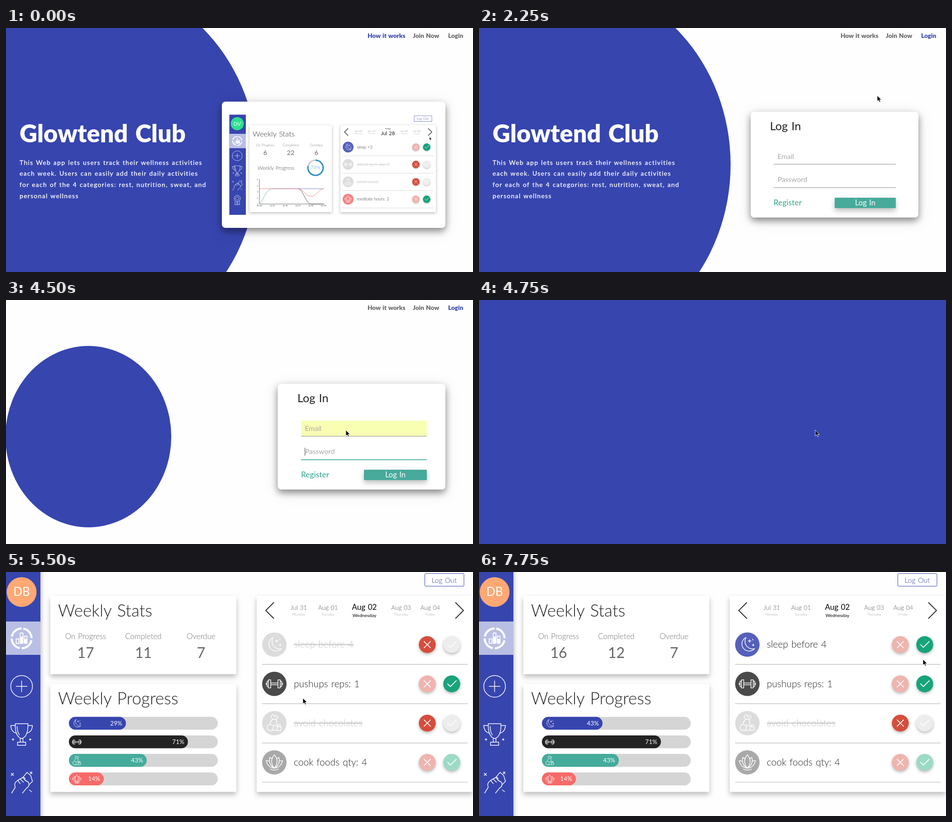
Recreate the animation shown at these times as an HTML page. Size 1032 px wide and 542 px high, loop 8 s.

```html
<!DOCTYPE html>
<html lang="en">
<head>
<meta charset="utf-8">
<title>Habit tracker tour</title>
<style>
html, body { margin: 0; width: 100%; height: 100%; overflow: hidden; background: #fefefe; }
svg { display: block; width: 1032px; height: 542px; }
text { font-family: Lato, sans-serif; word-spacing: .07em; white-space: pre; }
.ui { font-family: Inter, sans-serif; }
.medium { letter-spacing: 1.29px; stroke: #fff; stroke-width: .3px; }
.card { filter: drop-shadow(0 7px 8px rgba(0,0,0,.42)) drop-shadow(0 4px 14px rgba(0,0,0,.1)); }
.panel { filter: drop-shadow(0 6px 6px rgba(0,0,0,.26)); }
.mini { filter: drop-shadow(0 2px 3px rgba(0,0,0,.28)); }
.btn { filter: drop-shadow(0 3px 3px rgba(0,0,0,.28)); }
.side { filter: drop-shadow(2px 0 5px rgba(0,0,0,.25)); }
</style>
</head>
<body>
<svg id="stage" viewBox="0 0 1032 542"></svg>
<script>
const BLUE = '#3745af', TEAL = '#47aa9b', INK = '#222', GREY = '#707070';
const STEP = 250, STEPS = 32;

const text = (s, x, y, size, fill = INK, weight = 300, anchor = 'start', more = '') =>
  `<text x="${x}" y="${y}" font-size="${size}" fill="${fill}" font-weight="${weight}" text-anchor="${anchor}" ${more}>${s}</text>`;
const mid = (s, x, y, size, fill, weight) => text(s, x, y, size, fill, weight, 'middle');
const rect = (x, y, x2, y2, fill, more = '') =>
  `<rect x="${x}" y="${y}" width="${x2 - x}" height="${y2 - y}" fill="${fill}" ${more}/>`;
const disc = (x, y, r, fill, more = '') => `<circle cx="${x}" cy="${y}" r="${r}" fill="${fill}" ${more}/>`;
const line = (d, stroke, width = 1, more = '') =>
  `<path d="${d}" fill="none" stroke="${stroke}" stroke-width="${width}" ${more}/>`;
const at = (x, y, scale, body) => `<g transform="translate(${x} ${y}) scale(${scale})">${body}</g>`;
const white = (d, width = 1.5) => line(d, '#fff', width, 'stroke-linejoin="round" stroke-linecap="round"');

const icons = {
  stats: disc(0, 0, 22, 'none', 'stroke="#fff" stroke-width="4.5" stroke-dasharray="30 4.5" transform="rotate(-80)"') +
    white('M-12 11V1H-6V11ZM-3 11V-12H3V11ZM6 11V-5H12V11Z', 1.8) + rect(-3, -4, 3, 11, '#fff') + rect(6, 1, 12, 11, '#fff'),
  plus: white('M-24 0A24 24 0 1 1 24 0A24 24 0 1 1-24 0M0-12V12M-12 0H12'),
  trophy: white('M-14-23H14Q15 6 0 10Q-15 6-14-23ZM-14-19H-24Q-23-4-11-2M14-19H24Q23-4 11-2M-3 10V18H3V10M-9 25V18H9V25ZM-10-17Q-9-3-5 2M-19 10V14M-21 12H-17M19 10V14M17 12H21'),
  hands: white('M-22 24L-14 11Q-18 2-9-4L3-11Q9-11 7-5L15 0Q19 8 11 13L2 24M3-11L12-22L20-15L24-2L17 5M-9-4L-3 3M-3-7L4 0M3-10L9-3M-23-20L-18-15M-18-20L-23-15M19-23L23-19M23-23L19-19M17 17L22 21'),
  badge: white('M-15-8A15 15 0 1 1 15-8A15 15 0 1 1-15-8M-8-8A8 8 0 1 1 8-8A8 8 0 1 1-8-8M-11 4V24L-6 20L-2 24V8M11 4V24L6 20L2 24V8'),
  moon: white('M-3-16A16 16 0 1 0 16 9A17 17 0 0 1-3-16ZM5-11V-5M2-8H8M13-1V3M11 1H15M12-12V-10'),
  gym: white('M-8-2H8V2H-8ZM-13-9H-8V9H-13ZM13-9H8V9H13ZM-16-6H-13V6H-16ZM16-6H13V6H16ZM-18-2V2M18-2V2'),
  food: white('M-10 3Q-7-10 0-9Q7-8 5 3M-4-9Q-10-15-4-18Q0-20 1-14Q5-19 8-14Q8-10 3-9M-16 10A7 7 0 0 1-2 10A7 7 0 0 1-16 10M-2 5H6V16H-8M6 8H15V16H6M9 8V3H13V8'),
  lotus: white('M0-17Q12-3 0 13Q-12-3 0-17ZM-5-8L-10-11Q-14 4 0 13M5-8L10-11Q14 4 0 13M-11-3L-18-4Q-15 11 0 13M11-3L18-4Q15 11 0 13M-9 15Q0 19 9 15')
};
const icon = (name, x, y, scale) => at(x, y, scale, icons[name]);

const looks = {
  done: ['', INK, '#efb4ae', '#17a47b'],
  missed: ['#dcdcdc', '#c6c6c6', '#d64d3c', '#ededed'],
  open: ['#a9a9a9', INK, '#efb4ae', '#9bdac6']
};

function row(x, y, scale, [name, label, state, tint]) {
  const [shade, ink, no, yes] = looks[state];
  const strike = state == 'missed' ? 'text-decoration="line-through"' : '';
  return at(x, y, scale,
    disc(0, 0, 27, shade || tint) + icons[name] +
    text(label, 43, 7, 21, ink, 300, 'start', strike) +
    disc(338, 0, 18.7, no, 'class="btn"') + white('M331-7L345 7M345-7L331 7', 1.8) +
    disc(392, 0, 18.7, yes, 'class="btn"') + white('M383 0L389 6L402-7', 1.8) +
    line('M-27 44H427', '#c4c4c4', 1.4));
}

const stat = (x, y, size, label, n) =>
  mid(label, x, y, size, GREY) + mid(n, x, y + size * 2.5, size * 1.88, '#666', 400);

const hero = () =>
  text('Glowtend Club', 30, 253.5, 54, '#fff', 900) +
  ['This Web app lets users track their wellness activities',
   'each week. Users can easily add their daily activities',
   'for each of the 4 categories: rest, nutrition, sweat, and',
   'personal wellness'].map((s, i) =>
    text(s, 30, 303.5 + i * 24.7, 14, '#fff', 400, 'start', 'class="medium"')).join('');

const nav = active => [['How it works', 799], ['Join Now', 899], ['Login', 977]].map(([s, x], i) =>
  text(s, x, 22.3, 13.6, i == active ? BLUE : '#666', 900)).join('');

const blob = scale => `<ellipse cx="182" cy="303.5" rx="${374 * scale}" ry="${411 * scale}" fill="${BLUE}"/>`;

function chart(k) {
  const dip = 357 + 17 * [1, .75, .45, .2, .05, 0][Math.min(k, 5)];
  const days = [0, 1, 2, 3, 4, 5].map(i => 560 + i * 28.4);
  const dots = k < 4 ? '' : days.map((x, i) =>
    disc(x, 357, 1.2, '#fff', 'stroke="#e88" stroke-width=".7"') +
    (i == 0 || i > 3 ? disc(x, 391, 1.2, '#fff', 'stroke="#555" stroke-width=".7"') : '')).join('');
  return line('M560 336V391H703', '#444', .8) +
    [0, 2, 4, 6, 8].map(n => text(n, 557, 392.5 - n * 6.8, 4.5, '#555', 400, 'end')).join('') +
    days.map((x, i) => mid('Jul ' + (24 + i), x, 396, 4.2, INK, 400)).join('') +
    line('M560 391C570 380 576 357 588 357', '#6fb5b8') +
    line('M645 357C657 357 662 391 674 391H702', '#555') +
    line('M588 357H702', '#7b80d8') +
    line(`M560 357H645C656 357 663 ${dip} 674 ${dip}S692 357 702 357`, '#ec8484') + dots;
}

function preview(k) {
  const tasks = [
    ['moon', 'sleep +3', 'done', '#5560bb'], ['gym', 'attend gym qty: 2', 'missed'],
    ['food', 'avoid candy', 'missed'], ['lotus', 'meditate hours: 2', 'done', '#f5817f']];
  const dates = [[779, 'Jul 26', 'Wednesday'], [808, 'Jul 27', 'Thursday'], [880, 'Jul 29', 'Saturday'], [908, 'Jul 30', 'Sunday']];
  return rect(477, 163.5, 971, 444, '#fff', 'rx="8" class="card"') +
    rect(493.5, 192.5, 530, 415, BLUE) + rect(493.5, 235, 530, 267, '#b9bfe4') +
    disc(511, 212.5, 14.5, '#2de08f') + mid('DV', 511, 216.5, 11.5, '#fff', 400) +
    ['stats', 'plus', 'trophy', 'hands', 'badge'].map((n, i) => icon(n, 511, 251 + i * 32.8, .46)).join('') +
    rect(902, 195, 941, 207.5, '#fff', 'stroke="#8088cc"') + mid('Log Out', 921, 204, 7.3, BLUE) +
    rect(538, 216, 720, 409, '#fff', 'class="mini"') + text('Weekly Stats', 545, 241, 16.5, '#333') +
    stat(573, 262.5, 7.6, 'On Progress', 6) + stat(629, 262.5, 7.6, 'Completed', 22) + stat(686, 262.5, 7.6, 'Overdue', 6) +
    text('Weekly Progress', 556, 315, 11.3, '#444') +
    disc(684, 310.5, 16.8, 'none', 'stroke="#ccc" stroke-width="3"') +
    disc(684, 310.5, 16.8, 'none', 'stroke="#2f8fc6" stroke-width="3" pathLength="100" stroke-dasharray="79 21" transform="rotate(-90 684 310.5)"') +
    mid('79%', 684, 314, 11, '#4a9dcc') + chart(k) +
    rect(739, 216, 950, 409, '#fff', 'class="mini"') +
    line('M756 223L748 231L756 239', INK, 1.2) + line('M933 223L941 231L933 239', k < 5 ? INK : '#bbb', 1.2) +
    dates.map(([x, d, w]) => mid(d, x, 230.5, 6.3, GREY) + mid(w, x, 236, 3.7, '#999')).join('') +
    mid('Friday', 844, 225, 4.6, INK, 400) + mid('Jul 28', 844, 238, 11.6, INK, 400) +
    tasks.map((t, i) => row(756, 264.5 + i * 38.6, .443, t)).join('') +
    pointer(936, 242, .5);
}

function login(k) {
  const dx = k >= 17 ? 1 : 0, left = 651 + dx, right = k >= 17 ? 930 : 921;
  const email = 'doma@moved.test', typed = k >= 11 && k <= 13;
  const onPass = k >= 16, focus = k >= 10 && !onPass;
  const under = (y, on) => rect(left, y, right, y + (on ? 1.6 : 1.2), on ? '#2fa58e' : '#999');
  let s = rect(600.5, 186, 971, 421, '#fff', 'rx="8" class="card"') +
    text('Log In', 643 + dx, 227, 25.2, INK, 400);
  if (k >= 14) s += rect(left, 268, right, 302, '#f8ffb3');
  if (k == 14) s += rect(668, 276, 780, 293.5, '#a9cfd6');
  const value = typed ? 'd' : k >= 14 && k < 18 ? email : '';
  s += text(value || 'Email', 659.5 + dx, 290.5, value ? 14.8 : 15.6, value ? INK : '#aaa', 400) +
    under(302, focus) + under(354, onPass);
  const dots = k == 16 ? 4 : k == 17 ? 8 : 0;
  s += dots ? text('•'.repeat(dots), 660, 342, 16, INK, 400) : text('Password', 660 + dx, 342, 15.6, '#aaa', 400);
  if (k == 18) s += rect(660, 328, 661, 346, '#555');
  const bx = k >= 17 ? 791 : 786;
  s += text('Register', left, 394, 17.4, '#2fa58e', 400) +
    rect(bx, 377, right, 400, TEAL, 'rx="1" class="panel"') + mid('Log In', (bx + right) / 2, 394, 16.6, '#fff', 400);
  if (k >= 11 && k <= 14)
    s += rect(651.5, 304.5, 920.5, 345.5, '#fff', 'stroke="#a5bde6"') +
      (k == 14 ? rect(652, 305, 920, 325, '#a9d0ff') : '') +
      text(email, 658, 319.5, 10.4, '#000', 600, 'start', 'class="ui"') +
      text('dupo@51', 658, 339.5, 10.4, '#000', 600, 'start', 'class="ui"');
  return s;
}

function dashboard(k) {
  const slept = k >= 30, fresh = k >= 31, grow = k == 20 ? .3 : k == 21 ? .75 : 1;
  const bars = [
    ['moon', BLUE, fresh ? 43 : 29, fresh ? 134 : 126], ['gym', '#232323', 71, 263],
    ['food', '#45ab9b', 43, fresh ? 170 : 172], ['lotus', '#f66b69', 14, fresh ? 75 : 77]];
  const tasks = [
    ['moon', 'sleep before 4', slept ? 'done' : 'missed', '#5560bb'], ['gym', 'pushups reps: 1', 'done', '#4a4a4a'],
    ['food', 'avoid chocolates', 'missed'], ['lotus', 'cook foods qty: 4', 'open']];
  const dates = [[647, 'Jul 31', 'Monday'], [711.5, 'Aug 01', 'Tuesday'], [873, 'Aug 03', 'Thursday'], [937.5, 'Aug 04', 'Friday']];
  return rect(0, -10, 76, 552, BLUE, 'class="side"') + rect(0, 110, 76, 184, '#b9bfe4') +
    disc(34.5, 44.5, 33, '#ffa873') + mid('DB', 34.5, 53, 26, '#fff', 400) +
    icon('stats', 34.5, 147.5, 1) + icon('plus', 34.5, 254, 1) + icon('trophy', 34.5, 360, 1) + icon('hands', 34.5, 467, 1) +
    rect(925.5, 3.5, 1012, 31.5, '#fff', `rx="2" stroke="${BLUE}"`) + mid('Log Out', 968.5, 24, 15.8, BLUE) +
    rect(98, 53, 509, 227, '#fff', 'class="panel"') + text('Weekly Stats', 115, 99, 37) +
    stat(176, 148.5, 17, 'On Progress', fresh ? 16 : 17) + stat(303.5, 148.5, 17, 'Completed', fresh ? 12 : 11) + stat(431, 148.5, 17, 'Overdue', 7) +
    rect(98, 249, 509, 488.5, '#fff', 'class="panel"') + text('Weekly Progress', 115, 294, 37) +
    bars.map(([n, c, pct, w], i) => {
      const y = 336 + i * 41.2, end = 139 + Math.max(36, w * grow);
      return rect(139, y - 14.3, 468, y + 14.3, '#d5d5d5', 'rx="14.3"') + rect(139, y - 14.3, end, y + 14.3, c, 'rx="14.3"') +
        icon(n, 156.5, y + .5, .56) + (grow > .5 ? text(pct + '%', end - 8, y + 4.5, 13.6, '#fff', 400, 'end') : '');
    }).join('') +
    rect(554, 53, 1031, 488.5, '#fff', 'class="panel"') +
    line('M592 67.5L574 85.5L592 103.5', INK, 1.8) + line('M993 67.5L1011 85.5L993 103.5', INK, 1.8) +
    dates.map(([x, d, w]) => mid(d, x, 84, 13.6, '#555') + mid(w, x, 97, 8.2, '#999')).join('') +
    mid('Aug 02', 792, 84, 17, '#000', 400) + mid('Wednesday', 792, 99.5, 10.2, '#000', 400) +
    tasks.map((t, i) => row(593, 161.3 + i * 87.2, 1, t)).join('');
}

const pointer = (x, y, scale = 1) => at(x, y, scale,
  '<path d="M0 0V13L3 10.2L5 14.8L7.2 13.9L5.2 9.5H9.2Z" fill="#000" stroke="#fff" stroke-width=".9"/>');

// step, x, y
const path = [[6, 1003, -6], [7, 994, 12], [8, 992, 16], [9, 880, 150], [10, 751, 289], [19, 743, 289],
  [20, 725, 290], [21, 690, 285], [22, 656, 280], [24, 650, 288], [25, 690, 260], [26, 770, 205],
  [27, 870, 125], [28, 941, 92], [29, 984, 160], [31, 981, 194]];

function scene(k) {
  let s;
  if (k >= 20) s = dashboard(k);
  else if (k == 19) s = rect(0, 0, 1032, 542, BLUE);
  else {
    s = blob(k == 18 ? .49 : k == 17 ? .8 : 1) + (k < 17 ? hero() : '') +
      nav(k < 8 ? 0 : 2) + (k < 8 ? preview(k) : login(k));
  }
  const spot = path.filter(p => p[0] <= k).pop();
  return s + (spot ? pointer(spot[1], spot[2]) : '');
}

const stage = document.getElementById('stage');
const start = performance.now();
let shown = -1;
function tick() {
  const k = Math.floor((performance.now() - start) / STEP) % STEPS;
  if (k != shown) stage.innerHTML = scene(shown = k);
  requestAnimationFrame(tick);
}
tick();
</script>
</body>
</html>
```
